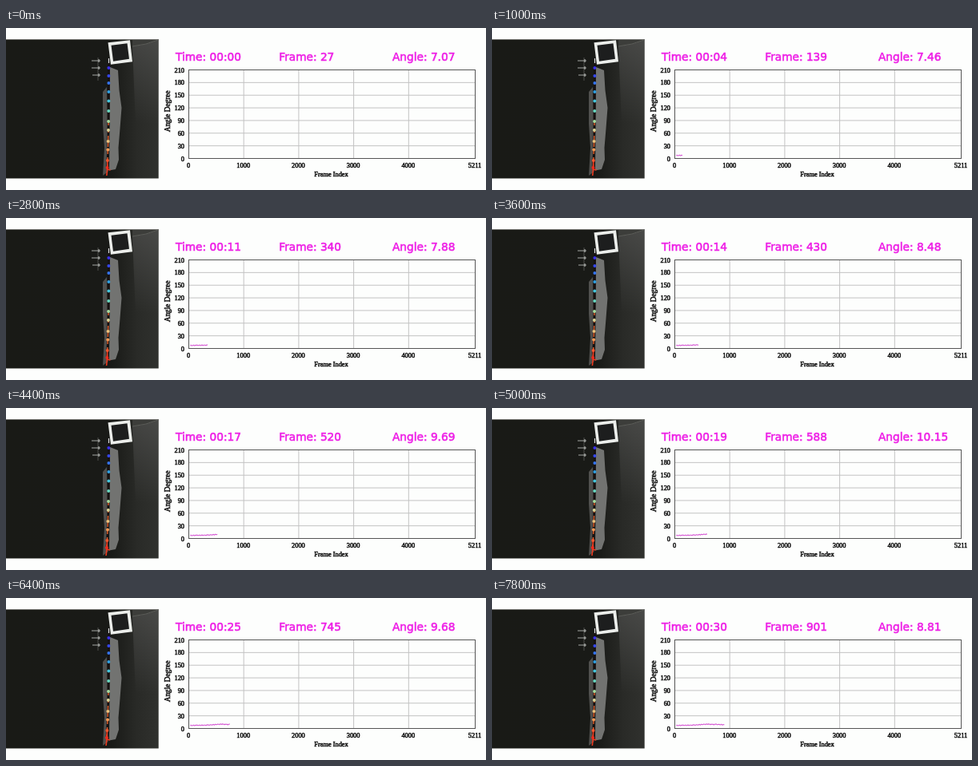
These frames come from a looping animation (600 px wide and 203 px high, 8 s). An HTML page:

```html
<!DOCTYPE html>
<html lang="en">
<head>
<meta charset="utf-8">
<title>Bend angle tracking</title>
<style>
  html, body { margin: 0; width: 100%; height: 100%; overflow: hidden; background: #fdfefd; }
  svg { display: block; width: 100%; height: 100%; }
  .head { font: 13.7px "DejaVu Sans", sans-serif; fill: #ee20e6; stroke: #ee20e6; stroke-width: .6; }
  .axis { font: 8.4px "Liberation Serif", serif; fill: #111; stroke: #111; stroke-width: .5; }
</style>
</head>
<body>
<svg viewBox="0 0 600 203" preserveAspectRatio="none">
  <defs>
    <linearGradient id="board">
      <stop offset="0" stop-color="#191a16"/>
      <stop offset=".7" stop-color="#191a17"/>
      <stop offset=".86" stop-color="#292a27"/>
      <stop offset="1" stop-color="#30312e"/>
    </linearGradient>
    <linearGradient id="sheen" x1="0" y1="0" x2="0" y2="1">
      <stop offset="0" stop-color="#777" stop-opacity=".35"/>
      <stop offset="1" stop-color="#777" stop-opacity="0"/>
    </linearGradient>
    <filter id="soft"><feGaussianBlur stdDeviation=".5"/></filter>
  </defs>

  <g filter="url(#soft)">
    <rect x="-4" y="14" width="194.7" height="174.5" fill="url(#board)"/>
    <path d="M158 23Q176 21 190 15V120H162Z" fill="url(#sheen)"/>
    <path d="M0 14.5H190" stroke="#6a6b67"/>
    <path d="M158 15H190Q176 21 158 23Z" fill="#3c3d3a"/>
    <path d="M158 23Q176 21 190 15" fill="none" stroke="#5b5c58"/>
    <path d="M121 80L126 74 127.5 180 121 185 123 150 121 120Z" fill="#50504e"/>
    <path d="M130 49L140 53 141.5 78 144.5 100 142.5 126 140.5 150 141 165 137 177 129 178.5 129.5 120Z" fill="#727371"/>
    <path d="M115 37V66" stroke="#5b5e5c" stroke-width=".8"/>
    <path d="M107 41H118M107 50H118M108 59H118" stroke="#a5a8a5"/>
    <path d="M116 39V43M116 48V52M116 57V61" stroke="#c5c7c4"/>
    <path d="M127.5 18.3L155 15.3 158 42.3 131 45.8Z" fill="#eceeeb"/>
    <path d="M131.5 21.8L151.5 19.3 154 38.8 134 41.8Z" fill="#1d1e1e"/>
    <path d="M128.5 38V47" stroke="#ddd" stroke-width="1.2"/>
  </g>
  <g id="spine"></g>

  <g id="grid" stroke="#c2c2c2"></g>
  <rect x="228.5" y="52.5" width="358" height="111" fill="none" stroke="#555"/>
  <g id="ticks" class="axis"></g>
  <text class="axis" x="406.5" y="186.2" text-anchor="middle">Frame Index</text>
  <text class="axis" transform="translate(205 104.4) rotate(-90)" text-anchor="middle" style="font-size:9.3px">Angle Degree</text>
  <path id="curve" fill="none" stroke="#d65bd4" stroke-width="1.1" stroke-linejoin="round"/>

  <g class="head">
    <text id="time" x="212" y="41.2"></text>
    <text id="frame" x="341.3" y="41.2"></text>
    <text id="angle" x="483" y="41.2"></text>
  </g>
</svg>
<script>
const LOOP = 8000, STEP = 200, FPS = 29.8;
// step, frame index, angle
const KEYS = [
  [0, 27, 7.07], [5, 139, 7.46], [14, 340, 7.88], [22, 520, 9.69],
  [26, 610, 10.3], [29, 677, 9.4], [32, 745, 9.68], [39, 901, 8.81]
];
const DOTS = [
  [50, '#3a30e8'], [60, '#3548f0'], [69, '#3474ec'], [80, '#2f9fe0'],
  [91.5, '#45c4da'], [104, '#68d6c0'], [117, '#a4dba0'], [128, '#d8d698'],
  [142, '#edc17c'], [152.5, '#f39a56'], [166, '#f4562e'], [175, '#f02a1c']
];
const $ = id => document.getElementById(id);

function add(parent, tag, attrs, text) {
  const el = document.createElementNS('http://www.w3.org/2000/svg', tag);
  for (const k in attrs) el.setAttribute(k, attrs[k]);
  if (text !== undefined) el.textContent = text;
  $(parent).appendChild(el);
  return el;
}

const px = f => 228.5 + f * 358 / 5211;
const py = a => 163.5 - a * 111 / 210;

for (const f of [0, 1000, 2000, 3000, 4000, 5211]) {
  if (f % 5211) add('grid', 'path', { d: `M${px(f)} 52.5V163.5` });
  add('ticks', 'text', { x: px(f) - .5, y: 174.5, 'text-anchor': 'middle' }, f);
}
for (let a = 0; a <= 210; a += 30) {
  if (a % 210) add('grid', 'path', { d: `M228.5 ${py(a)}H586.5` });
  add('ticks', 'text', { x: 223, y: py(a) + 3, 'text-anchor': 'end' }, a);
}

const core = add('spine', 'path', { fill: 'none', stroke: '#161010', 'stroke-width': 2.4 });
const link = add('spine', 'path', { fill: 'none', stroke: '#e5602c', 'stroke-width': 1.4, 'stroke-dasharray': '5 4' });
const tail = add('spine', 'path', { fill: 'none', stroke: '#ee3a20', 'stroke-width': 1.6 });
const dots = DOTS.map(([y, fill]) => add('spine', 'circle', { cy: y, r: 2, fill }));

// Finds the key span holding v in the given column, and the share of it passed.
function span(v, col) {
  let i = 0;
  while (i < KEYS.length - 2 && v > KEYS[i + 1][col]) i++;
  const a = KEYS[i], b = KEYS[i + 1];
  return { a, b, i, u: (v - a[col]) / (b[col] - a[col]) };
}

function frameAt(step) {
  const { a, b, u } = span(step, 0);
  return Math.round(a[1] + (b[1] - a[1]) * u);
}

function angleAt(frame) {
  const { a, b, i, u } = span(frame, 1);
  const n = Math.max(2, Math.round((b[1] - a[1]) / 22));
  const ripple = .55 * Math.sin(Math.PI * n * u) + .3 * Math.sin(Math.PI * (n + 3 + i % 2) * u);
  return a[2] + (b[2] - a[2]) * u + ripple;
}

function render(ms) {
  const frame = frameAt(Math.floor((ms % LOOP) / STEP));
  const angle = angleAt(frame);
  const sec = Math.floor(frame / FPS);
  $('time').textContent = 'Time: 00:' + String(sec).padStart(2, '0');
  $('frame').textContent = 'Frame: ' + frame;
  $('angle').textContent = 'Angle: ' + +angle.toFixed(2);

  let d = '';
  for (let f = 27; f < frame; f += 4) d += `${d ? 'L' : 'M'}${px(f).toFixed(2)} ${py(angleAt(f)).toFixed(2)}`;
  $('curve').setAttribute('d', d && d + `L${px(frame)} ${py(angle)}`);

  const bend = y => 128.4 - (.26 * angle) * ((y - 50) / 125) ** 3;
  const pts = DOTS.map(([y]) => `${bend(y).toFixed(2)} ${y}`);
  core.setAttribute('d', 'M128.5 44L' + pts.join('L'));
  link.setAttribute('d', 'M' + pts.slice(6).join('L'));
  tail.setAttribute('d', `M${pts[10]}L${bend(175)} 178L${bend(178) - .6} 185M${bend(175)} 177L${bend(175) + 4} 178`);
  dots.forEach((c, i) => c.setAttribute('cx', bend(DOTS[i][0])));
}

const start = performance.now();
function tick() {
  render(performance.now() - start);
  requestAnimationFrame(tick);
}
tick();
</script>
</body>
</html>
```
